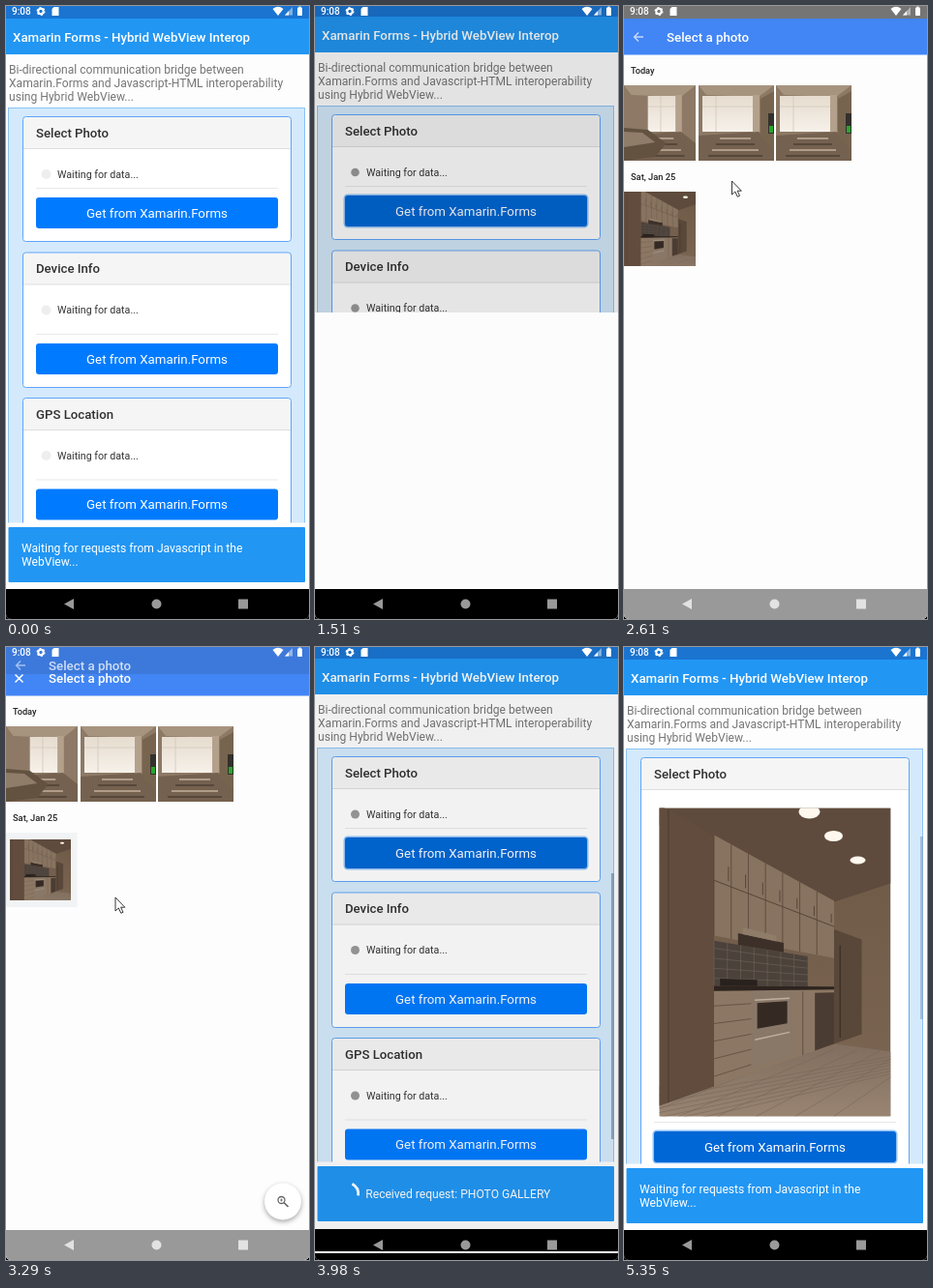
Write an HTML page that moves like this. It is 313x634 px and loops after 5400 ms.

```html
<!DOCTYPE html>
<html lang="en">
<head>
<meta charset="utf-8">
<title>Hybrid WebView demo</title>
<style>
  html, body { margin: 0; width: 100%; height: 100%; overflow: hidden; background: #000; }
  #stage { position: relative; width: 313px; height: 634px; overflow: hidden; border-radius: 0 0 5px 5px; }
  #stage > svg { position: absolute; left: 0; top: 0; width: 313px; height: 634px; }
  #zoom { filter: drop-shadow(0 2px 2.5px rgba(0, 0, 0, .35)); }
  text { font-family: Roboto, "Noto Sans", sans-serif; white-space: pre; }
  .m { font-weight: 500; }
</style>
</head>
<body>
<div id="stage"></div>
<script>
const LOOP = 5400;
const BEAT = 137.2;

// ---------- drawing helpers ----------
const rect = (x, y, w, h, fill, more = '') =>
  `<rect x="${x}" y="${y}" width="${w}" height="${h}" fill="${fill}" ${more}/>`;
const circle = (x, y, r, fill, more = '') => `<circle cx="${x}" cy="${y}" r="${r}" fill="${fill}" ${more}/>`;
const text = (x, y, size, str, fill, more = '') =>
  `<text x="${x}" y="${y}" font-size="${size}" fill="${fill}" ${more}>${str}</text>`;
const poly = (points, fill, more = '') => `<polygon points="${points}" fill="${fill}" ${more}/>`;
const path = (d, stroke, width = 1) => `<path d="${d}" fill="none" stroke="${stroke}" stroke-width="${width}"/>`;
const group = (id, body, more = '') => `<g id="${id}" ${more}>${body}</g>`;
const layer = (id, body) => `<svg id="${id}" viewBox="0 0 313 634">${body}</svg>`;
const picture = (id, x, y, w, h) => `<use href="#${id}" x="${x}" y="${y}" width="${w}" height="${h}"/>`;
const range = (n, fn) => Array.from({ length: n }, (_, i) => fn(i)).join('');
const symbol = (id, box, fit, body) =>
  `<symbol id="${id}" viewBox="${box}" preserveAspectRatio="${fit}">${body}</symbol>`;
const fade = (id, from, to) => `<linearGradient id="${id}" x2="0" y2="1">
  <stop stop-color="${from}"/><stop offset="1" stop-color="${to}"/></linearGradient>`;
const MED = 'class="m"';

// ---------- pictures ----------
// Point on the receding kitchen wall: u runs along it, v from top to floor.
const wall = (u, v) => {
  const top = 28 + 68 * u, floor = 288 - 44 * u;
  return `${56.500 + 124 * u},${top + (floor - top) * v}`;
};
const panel = (u, v, u2, v2, fill) =>
  poly([wall(u, v), wall(u2, v), wall(u2, v2), wall(u, v2)].join(' '), fill);
const seam = (u, v, u2, v2, color, width) => path(`M${wall(u, v)}L${wall(u2, v2)}`, color, width);
const DARK = '#57453a';

const kitchen = symbol('kitchen', '0 0 239 319', 'xMidYMid slice',
  rect(0, 0, 239, 319, 'url(#plaster)') +
  poly('0,0 239,0 239,78 181,97 57,28 0,18', '#5f4b3d') +
  poly('0,288 181,244 239,252 239,319 0,319', 'url(#tiles)') +
  range(7, i => path(`M0 ${330 - i * 5}L239 ${275 - i * 3}M${i * 40 - 60} 319L${130 + i * 25} 250`, '#78675a', .6)) +
  panel(-.46, 0, 0, 1, '#614c3e') + seam(-.38, 0, -.38, 1, '#4e3b30') +
  panel(0, 0, 1, .4, '#87735f') + seam(0, .18, 1, .18, DARK) +
  range(7, i => seam(i / 7, 0, i / 7, .4, DARK, .8) + seam(i / 7 + .12, .1, i / 7 + .12, .16, DARK)) +
  panel(0, .42, .78, .6, '#4b423b') +
  range(4, i => seam(0, .45 + i * .04, .78, .45 + i * .04, '#71655b', .6)) +
  range(7, i => seam(i / 9, .42, i / 9, .6, '#71655b', .6)) +
  panel(.2, .37, .58, .42, '#3c3029') + panel(.24, .34, .52, .37, '#8f7c69') +
  panel(0, .62, 1, 1, '#8b7763') +
  range(5, i => seam(0, .68 + i * .07, .31, .68 + i * .07, DARK, .7)) +
  panel(.32, .61, .645, .98, '#897868') + panel(.36, .68, .61, .8, '#352a23') +
  seam(.34, .665, .63, .665, '#c0af9c', 1.500) + seam(.34, .85, .63, .85, '#c0af9c', 1.500) +
  seam(.74, .63, .74, 1, DARK, .8) +
  panel(.84, .64, 1, 1, '#4b3c33') + panel(0, .6, 1, .62, '#2d241f') + panel(.05, .57, .36, .6, '#29211d') +
  panel(1, .2, 1.230, 1, '#594839') + seam(1.050, .3, 1.050, .97, '#382c24', 1.200) +
  range(3, i => `<ellipse cx="${155 + i * 25}" cy="${4 + i * 25}" rx="${11 - i * 1.500}" ry="${7 - i * 1.500}" fill="#fff8ee"/>`));

const room = (id, left, extra) => symbol(id, '0 0 78 78', 'none',
  rect(0, 0, 78, 78, '#8d7966') + poly('0,0 78,0 62,12 8,10', '#a7947f') +
  rect(left, 11, 58 - left, 37, 'url(#sky)') + path(`M${left} 22H58M${left + 14} 11V48`, '#d3c7b9', .8) +
  rect(56, 10, 7, 42, '#b4a18c') + poly('0,52 62,48 78,60 78,78 0,78', '#75614f') +
  range(4, i => path(`M${22 - i * 4} ${55 + i * 6}H${54 + i * 4}`, i % 2 ? '#57473b' : '#b09d89', 2)) + extra);
const shelf = poly('64,14 78,6 78,66 64,54', '#77644f') + rect(72, 29, 6, 21, '#33302d') + rect(73, 42, 4, 7, '#27a52d');
const sofa = poly('0,44 26,46 46,60 34,74 0,78', '#62523f') + poly('0,48 20,49 34,59 0,64', '#8f7c69');
const defs = fade('plaster', '#6d5746', '#7c6753') + fade('tiles', '#816e5e', '#998472') +
  fade('sky', '#e6dccf', '#f6f1ea') + kitchen + room('roomA', 26, sofa) + room('roomB', 4, shelf);

// ---------- web page ----------
const button = (y, fill = '#007bff') => rect(31, y, 250, 32, fill, 'rx="3"') +
  text(156, y + 20.500, 13.270, 'Get from Xamarin.Forms', '#fff', 'text-anchor="middle"');
const focused = y => rect(29.500, y - 1.500, 253, 35, '#8fc1f8', 'rx="4.500"') + button(y, '#0067d6');

const frame = (y, h, title) => rect(17.500, y, 277, h, '#fff', 'rx="3"') +
  rect(18, y + .5, 276, 32.500, '#f5f5f5', 'rx="2.500"') + path(`M18 ${y + 33}H294`, '#dedede') +
  rect(17.500, y, 277, h, 'none', 'rx="3" stroke="#5ea5f9"') + text(31, y + 21, 13.200, title, '#303030', MED);

function card(y, h, title) {
  const top = y + h - 45.500;
  return frame(y, h, title) + circle(41.500, y + 59.500, 0, '#959595', 'class="dot"') +
    text(53, y + 63, 10.670, 'Waiting for data...', '#333') +
    path(`M31 ${top - 9.500}H281`, '#e9e9e9') + button(top);
}

const lines = (x, y, step, fill, list) => list.map((s, i) => text(x, y + step * i, 12.090, s, fill)).join('');
const main = rect(0, -4, 313, 640, '#fdfdfd') + rect(0, -4, 313, 17.500, '#1a74d0') +
  rect(0, 13, 313, 37, '#2196f3') +
  text(7, 36.500, 13.300, 'Xamarin Forms - Hybrid WebView Interop', '#fff', MED) +
  lines(3, 70, 14, '#757575', ['Bi-directional communication bridge between',
    'Xamarin.Forms and Javascript-HTML interoperability', 'using Hybrid WebView...']) +
  rect(2.500, 105.500, 306, 440, '#d4eafc', 'stroke="#8cc3f5"') +
  group('cards', card(114.500, 129, 'Select Photo') + card(255, 139.500, 'Device Info') +
    card(405.500, 139.500, 'GPS Location') + group('focus', focused(198))) +
  group('result', frame(114.500, 440, 'Select Photo') + picture('kitchen', 36.500, 166.500, 239, 319) +
    path('M31 491.500H281', '#e6e6e6') + focused(501)) +
  rect(306, 0, 3, 0, '#7896b4', 'id="bar"') +
  group('toast', rect(0, 534.500, 313, 75, '#fdfdfd') + rect(2.500, 539, 306.500, 57, '#2196f3', 'rx="1"') +
    group('idle', lines(16, 565, 14, '#fff', ['Waiting for requests from Javascript in the', 'WebView...'])) +
    group('busy', text(52.300, 572, 12.090, 'Received request: PHOTO GALLERY', '#fff') +
      '<path id="ring" fill="none" stroke="#fff" stroke-width="2.800"/>'));

// ---------- photo picker ----------
const heading = y => text(44, y, 13.300, 'Select a photo', '#fff', MED);
const backArrow = y => path(`M20 ${y}H10.500M15 ${y - 4.500}L10.500 ${y}L15 ${y + 4.500}`, '#c4d9fb', 1.400);
const folderRow = (y, pic, name, count) => group('', picture(pic, 7, y, 26.500, 27), 'class="thumb"') +
  text(44, y + 12, 10.600, name, '#212121') + text(44, y + 27.500, 9.300, count, '#757575');

const folders = rect(0, -4, 313, 640, '#fcfcfc') + rect(0, -4, 313, 17, '#757575') +
  rect(0, 13, 313, 37.500, '#4285f4') + backArrow(32) + heading(37) +
  text(7, 76, 10.600, 'Device folders', '#757575') +
  group('row', rect(0, 138.500, 313, 51.500, '#dcdcdc')) +
  folderRow(98, 'roomB', 'Camera', '1 item') + folderRow(149, 'roomA', 'TestPhotoFolder', '4 items');

const photos = rect(0, 0, 313, 634, '#fdfdfd') + rect(0, 0, 313, 50.500, '#4285f4') +
  group('plainBar', rect(0, 0, 313, 13, '#757575') + backArrow(32)) +
  group('pickBar', rect(0, 0, 313, 28, '#3d79da') + group('', backArrow(19) + heading(24), 'opacity=".75"') +
    path('M9.500 28.500l8 8M17.500 28.500l-8 8', '#fff', 1.500)) + heading(37) +
  text(7, 70, 9.200, 'Today', '#212121', MED) + text(7, 179.500, 9.300, 'Sat, Jan 25', '#212121', MED) +
  picture('roomA', 0, 82, 74, 78) + picture('roomB', 77, 82, 78, 78) + picture('roomB', 157, 82, 78, 78) +
  group('open', picture('kitchen', 0, 192, 74, 77)) +
  group('chosen', rect(0, 192, 73.500, 77, '#f1f3f4') + picture('kitchen', 4, 199, 63, 63)) +
  group('zoom', circle(286, 573.500, 19, '#fff') + circle(284.500, 572, 3.500, 'none', 'stroke="#666" stroke-width="1.300"') +
    path('M287 574.500l4.500 4.500', '#666', 1.700) + path('M283 572h3M284.500 570.500v3', '#666', .8));

// ---------- system bars ----------
const system = text(6, 9, 10, '9:08', '#fff', MED) +
  circle(36, 5.500, 2.700, 'none', 'stroke="#fff" stroke-width="2"') +
  circle(36, 5.500, 3.900, 'none', 'stroke="#fff" stroke-width="1.200" stroke-dasharray="2 2.084"') +
  poly('49.500,1 54.500,1 54.500,10 47.500,10 47.500,3', '#fff') +
  '<path d="M275.500 3Q281 -1.500 286.500 3L281 10Z" fill="#fff"/>' +
  poly('288,9.500 296,1 296,9.500', '#fff', 'opacity=".45"') + poly('288,9.500 292,5.200 292,9.500', '#fff') +
  rect(301, 1.500, 5, 8.500, '#fff', 'rx=".8"') + rect(302.500, .5, 2, 1.500, '#fff') +
  rect(0, 603, 313, 40, '#000', 'id="nav"') + rect(0, 628, 313, 6, '#fff', 'id="strip"') +
  group('keys', '<path d="M60 618.500L70 613V624Z"/><circle cx="155.500" cy="618.500" r="5"/>' +
    '<rect x="240" y="613.500" width="10" height="10"/>') +
  group('cursor', '<path d="M0 0V14L3.300 11L5.800 16.300L8 15.300L5.600 10.200H9.800Z" fill="#fff" stroke="#222" stroke-width=".9"/>');

const veil = id => rect(0, 0, 313, 634, '#000', `id="${id}"`);
document.getElementById('stage').innerHTML = `<svg style="width:0;height:0"><defs>${defs}</defs></svg>` +
  layer('main', group('mainBody', main) + veil('mainDim')) +
  layer('folders', group('folderBody', folders) + veil('folderDim')) +
  layer('photos', photos) + layer('system', system);

// ---------- motion, counted in beats ----------
const $ = id => document.getElementById(id);
const show = (id, on) => { $(id).style.display = on ? '' : 'none'; };
const set = (id, attrs) => { for (const k in attrs) $(id).setAttribute(k, attrs[k]); };
const move = (id, x, y) => set(id, { transform: `translate(${x} ${y})` });
const ramp = (n, start, length = 2) => Math.max(0, Math.min(1, (n - start) / length));
const cover = (n, enter, leave) => ramp(n, enter) - ramp(n, leave);
const during = (n, from, to = Infinity) => n >= from && n < to;

// A screen rises over the one below and drops away again.
function slide(id, amount) {
  show(id, amount > 0);
  $(id).style.clipPath = `inset(${634 * (1 - amount)}px 0 0 0)`;
}
// The screen below moves up a little and darkens.
function recede(body, dim, amount, shade) {
  move(body, 0, -2 * amount);
  set(dim, { opacity: shade * amount });
}

function arc(t) {
  const start = 85 + .242 * (t - 1235);
  const sweep = 172 + 105 * Math.cos(2 * Math.PI * (t - 1235) / 1820);
  const point = deg => {
    const a = deg * Math.PI / 180;
    return `${32.500 + 12.200 * Math.sin(a)} ${568 - 12.200 * Math.cos(a)}`;
  };
  return `M${point(start)}A12.200 12.200 0 ${sweep > 180 ? 1 : 0} 1 ${point(start + sweep)}`;
}

function render(n) {
  const t = n * BEAT;
  const busy = during(n, 5, 32), result = n >= 30, gray = during(n, 19, 25);

  const pulse = ((t - (n > 15 ? 530 : 80)) / 1000 + 1) % 1;
  document.querySelectorAll('.dot').forEach(dot => {
    dot.setAttribute('r', 5 * Math.min(1, pulse * 2));
    dot.setAttribute('opacity', Math.min(.95, 2 - pulse * 2));
  });
  show('busy', busy);
  show('idle', !busy);
  set('ring', { d: arc(t) });
  move('toast', 0, during(n, 7, 32) ? -1 : 0);
  show('focus', n >= 7);
  show('cards', !result);
  show('result', result);
  show('bar', n >= 28);
  set('bar', { y: result ? 196 : 235, height: result ? 189 : 275, opacity: .8 - .3 * ramp(n, 38, 1) });

  recede('mainBody', 'mainDim', cover(n, 9, 28), .1);
  slide('folders', cover(n, 10, 27));
  recede('folderBody', 'folderDim', cover(n, 17, 25), .18);
  slide('photos', cover(n, 17, 24));
  document.querySelectorAll('.thumb').forEach(g => { g.style.display = n >= 13 ? '' : 'none'; });
  show('row', during(n, 16, 25));
  show('zoom', n >= 20);
  show('open', n < 23);
  show('chosen', n >= 23);
  show('plainBar', n < 24);
  show('pickBar', n >= 24);

  const edge = during(n, 17, 30) && !gray, drop = edge ? ramp(n, 27) : 0;
  set('nav', { y: 603 - drop, fill: gray ? '#999' : '#000' });
  set('keys', { fill: gray ? '#e2e2e2' : '#999' });
  show('strip', edge);
  set('strip', { y: 628 - 3 * drop, height: 6 - 4 * drop });

  const reach = ramp(n, 19, 3), back = ramp(n, 23, 1);
  show('cursor', during(n, 16, 25));
  move('cursor', 111.500 - 78.500 * reach + 80 * back, 181 + 33 * reach + 45 * back);
}

const origin = performance.now();
let last = 0;
function tick() {
  const n = Math.floor(((performance.now() - origin) % LOOP + 5) / BEAT);
  if (n !== last) render(last = n);
  requestAnimationFrame(tick);
}
render(0);
requestAnimationFrame(tick);
</script>
</body>
</html>
```
